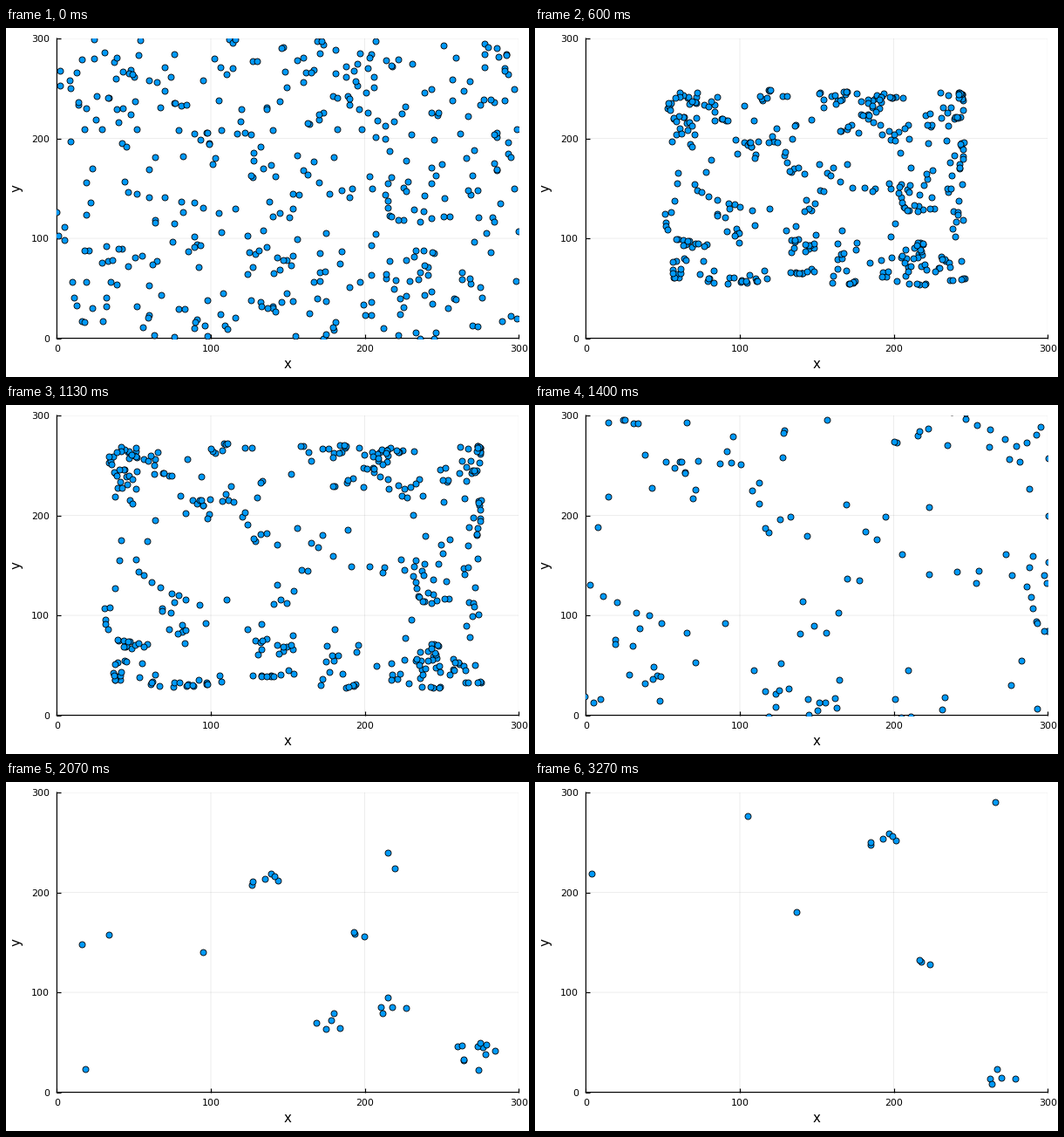
These frames come from a looping animation (600x400 px, 3.34 s). A matplotlib script:

```python
import numpy as np
import matplotlib.pyplot as plt
from matplotlib.animation import FuncAnimation

plt.rcParams["font.family"] = "DejaVu Sans"
WIDTH, HEIGHT, DPI = 600, 400, 100
PX = 72 / DPI
TICK_MS, LOOP_MS = 20, 3340
STEPS, STEP_MS = 50, 1000 / 15
SIZE, COUNT = 300, 420
CENTER = np.array([150.0, 150.0])
KEY_STEPS = [0, 5, 14, 21, 31, 37, 49]
rng = np.random.default_rng(12)

# Small flocks that linger: members, radius, first place, last place
FLOCKS = [
    (1, 0, (16, 148), (4, 219)),
    (1, 0, (34, 158), (105, 276)),
    (1, 0, (95, 140), (137, 180)),
    (1, 0, (215, 240), (266, 290)),
    (6, 14, (132, 221), (190, 261)),
    (3, 8, (195, 163), (219, 135)),
    (5, 10, (219, 85), (271, 14)),
    (5, 10, (174, 70), (235, -60)),
    (11, 15, (274, 37), (335, 10)),
]


def spread(points, scale):
    return CENTER + scale * (points - CENTER)


def squeeze(points, amount, power):
    """Pull points inward along each axis, the outer ones most."""
    offset = points - CENTER
    return CENTER + offset * (1 - amount * (np.abs(offset) / 150) ** power)


def gather(points, sight, strength=1):
    """Move every point toward the mean of its neighbours."""
    gaps = points[None] - points[:, None]
    weight = np.exp(-(gaps ** 2).sum(axis=2) / (2 * sight ** 2))
    pull = (weight[..., None] * gaps).sum(axis=1)
    return points + strength * pull / weight.sum(axis=1, keepdims=True)


def outside(points, reach=175):
    """Move points away from the center until they are off the plot."""
    offset = points - CENTER
    far = np.abs(offset).max(axis=1, keepdims=True)
    return CENTER + offset * np.maximum(1, reach / far)


def match(targets, candidates):
    """Give each target its nearest candidate that is still free."""
    free = np.ones(len(candidates), bool)
    chosen = []
    for target in targets:
        dist = np.hypot(*(candidates - target).T)
        index = np.where(free, dist, np.inf).argmin()
        free[index] = False
        chosen.append(index)
    return chosen


def flock_paths():
    first, last = [], []
    for members, radius, begin, end in FLOCKS:
        jitter = rng.uniform(-radius, radius, (members, 2))
        first.append(begin + jitter)
        last.append(end + jitter)
    return np.vstack(first), np.vstack(last)


def build_poses():
    start = rng.integers(0, SIZE + 1, (COUNT, 2)).astype(float)
    early = squeeze(gather(start, 12, 0.8), 0.16, 3)
    loose = gather(start, 18)
    tight = squeeze(gather(loose, 14), 0.55, 0.4) + (-2, 3)

    # The dense flock bursts apart; slow points near the middle leave last
    burst = spread(squeeze(loose, 0.55, 0.4), 3.1) + (12, -4)
    late = spread(burst, 2.2)
    later = spread(late, 2)
    last = outside(spread(later, 1.5))

    flock_first, flock_last = flock_paths()
    ids = match(spread(flock_first, 0.7), burst)
    u = (KEY_STEPS[5] - KEY_STEPS[4]) / (KEY_STEPS[6] - KEY_STEPS[4])
    late[ids] = flock_first
    later[ids] = (1 - u) * flock_first + u * flock_last
    last[ids] = flock_last
    return np.array([start, early, tight, burst, late, later, last])


POSES = build_poses()


def positions(step):
    i = min(np.searchsorted(KEY_STEPS, step, side="right"), len(KEY_STEPS) - 1)
    before, after = KEY_STEPS[i - 1], KEY_STEPS[i]
    u = (step - before) / (after - before)
    return (1 - u) * POSES[i - 1] + u * POSES[i]


fig = plt.figure(figsize=(WIDTH / DPI, HEIGHT / DPI), dpi=DPI, facecolor="white")
left, right, top, bottom = 58.4, 588.2, 12, 355.6
ax = fig.add_axes([left / WIDTH, 1 - bottom / HEIGHT,
                   (right - left) / WIDTH, (bottom - top) / HEIGHT])
ax.set(xlim=(0, SIZE), ylim=(0, SIZE),
       xticks=range(0, 301, 100), yticks=range(0, 301, 100))
ax.spines[["top", "right"]].set_visible(False)
ax.spines[["left", "bottom"]].set_linewidth(1.2 * PX)
ax.set_axisbelow(True)
ax.grid(color="black", alpha=0.1, linewidth=0.7 * PX)
ax.tick_params(direction="in", length=5 * PX, width=1.2 * PX,
               labelsize=11 * PX)
ax.tick_params(axis="x", pad=7 * PX)
ax.tick_params(axis="y", pad=8.3 * PX)
for line in (*ax.spines.values(), *ax.get_xgridlines(), *ax.get_ygridlines()):
    line.set_snap(False)
for name, px, py, angle in (("x", 323.3, 386, 0), ("y", 12, 184, 90)):
    fig.text(px / WIDTH, 1 - py / HEIGHT, name, size=15 * PX, rotation=angle,
             ha="center", va="center")

dots, = ax.plot([], [], "o", color="#009afa", markersize=7 * PX,
                markeredgecolor="black", markeredgewidth=0.85 * PX, zorder=3)


def update(tick):
    # Poses hold for a fifteenth of a second; the lead covers tick rounding
    step = int((tick * TICK_MS + 15) / STEP_MS)
    dots.set_data(*positions(min(step, STEPS - 1)).T)
    return (dots,)


animation = FuncAnimation(fig, update, frames=LOOP_MS // TICK_MS,
                          interval=TICK_MS, repeat=True)
plt.show()
```
